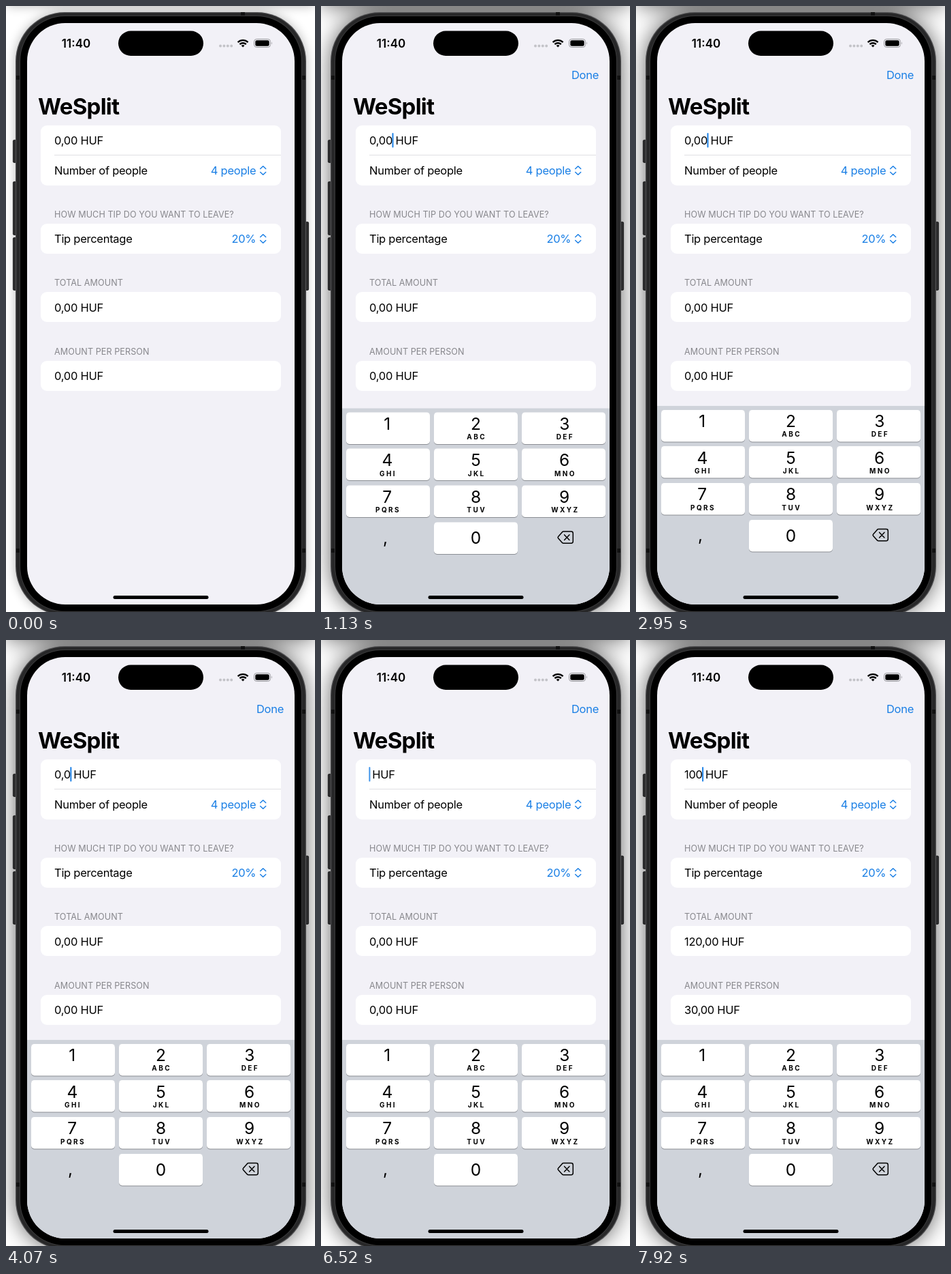
Write an HTML page that moves like this. It is 454x888 px and loops after 8 s.

```html
<!DOCTYPE html>
<html lang="en">
<head>
<meta charset="utf-8">
<title>Bill splitter</title>
<style>
html, body { margin: 0; width: 100%; height: 100%; overflow: hidden; background: #fff; }
svg { display: block; width: 454px; height: 888px; }
text { font: 16.5px Inter, sans-serif; letter-spacing: -.27px; font-optical-sizing: none; white-space: pre; }
.title { font-size: 33px; font-weight: 700; letter-spacing: -.75px; }
.clock { font-size: 17px; font-weight: 600; letter-spacing: 0; text-anchor: middle; }
.head { font-size: 12.6px; letter-spacing: .07px; fill: #87878c; }
.blue { fill: #1a7fe5; }
.end { text-anchor: end; }
.digit { font-size: 24.5px; letter-spacing: 0; text-anchor: middle; }
.letters { font-size: 10px; font-weight: 700; letter-spacing: 2.4px; text-anchor: middle; }
.chevron { fill: none; stroke: #1a7fe5; stroke-width: 1.5; stroke-linecap: round; stroke-linejoin: round; }
</style>
</head>
<body>
<svg viewBox="0 0 454 888">
  <defs>
    <filter id="blur" filterUnits="userSpaceOnUse" x="-150" y="-150" width="754" height="1250">
      <feGaussianBlur id="blurSize" stdDeviation="8"/>
    </filter>
    <clipPath id="screen"><rect x="31" y="25" width="393" height="852" rx="56"/></clipPath>
    <path id="chevrons" class="chevron" d="M-4-2.5L0-6.2L4-2.5M-4 2.5L0 6.2L4 2.5"/>
  </defs>

  <g id="shadow" filter="url(#blur)">
    <rect x="14" y="9" width="427" height="884" rx="72"/>
    <rect y="-60" width="454" height="60" rx="8"/>
  </g>

  <g fill="#2c2c2d" stroke="#161617" stroke-width=".8">
    <rect x="10.4" y="196.4" width="6" height="33" rx="1.5"/>
    <rect x="10.4" y="257.4" width="6" height="78" rx="1.5"/>
    <rect x="10.4" y="339.4" width="6" height="77" rx="1.5"/>
    <rect x="438.6" y="316.4" width="6" height="100" rx="1.5"/>
  </g>
  <rect x="14" y="9" width="427" height="884" rx="72" fill="#515153"/>
  <rect x="15.2" y="10.2" width="424.6" height="881.6" rx="71" fill="#272728"/>
  <path d="M345 12H351M15 105H21M434 105H440M15 798H21M434 798H440" stroke="#111" stroke-width="6"/>
  <rect x="20" y="14" width="415" height="874" rx="67" fill="#3a3a3b"/>
  <rect x="21" y="15" width="413" height="872" rx="66"/>
  <rect x="31" y="25" width="393" height="852" rx="56" fill="#f2f1f7"/>

  <rect x="165" y="36.5" width="125" height="36.5" rx="18.25"/>
  <text class="clock" x="103" y="60.5">11:40</text>
  <path d="M315 58.5H332" stroke="#c3c3c8" stroke-width="4" stroke-linecap="round" stroke-dasharray="0 5.4"/>
  <g fill="none" stroke="#000" stroke-width="2.4">
    <path d="M340.6 53.2a10.6 10.6 0 0 1 15 0M343.4 56.2a6.7 6.7 0 0 1 9.4 0"/>
    <path d="M348.1 60.6l-2.4-2.6a3.6 3.6 0 0 1 4.8 0z" fill="#000" stroke="none"/>
  </g>
  <rect x="364.5" y="48.5" width="24" height="12" rx="3.8" fill="none" stroke="#98989c"/>
  <rect x="366.3" y="50.3" width="20.4" height="8.4" rx="2.3"/>
  <path d="M390 52.6q1.8 1.9 0 3.8z" fill="#98989c"/>

  <text class="title" x="47" y="159">WeSplit</text>
  <g fill="#fff">
    <rect x="51" y="175" width="353" height="88" rx="9"/>
    <rect x="51" y="319" width="353" height="44" rx="9"/>
    <rect x="51" y="419" width="353" height="44" rx="9"/>
    <rect x="51" y="520" width="353" height="44" rx="9"/>
  </g>
  <path d="M71 218.5H404" stroke="#e0e0e3"/>
  <text id="amount" x="71" y="203"></text>
  <text x="71" y="247">Number of people</text>
  <text class="blue end" x="367.3" y="247">4 people</text>
  <use href="#chevrons" x="377.7" y="241"/>
  <text class="head" x="71" y="310">HOW MUCH TIP DO YOU WANT TO LEAVE?</text>
  <text x="71" y="347">Tip percentage</text>
  <text class="blue end" x="367.3" y="347">20%</text>
  <use href="#chevrons" x="377.7" y="341"/>
  <text class="head" x="71" y="410">TOTAL AMOUNT</text>
  <text id="total" x="71" y="447.7"></text>
  <text class="head" x="71" y="510.5">AMOUNT PER PERSON</text>
  <text id="share" x="71" y="548"></text>

  <g id="editing">
    <text class="blue end" x="408" y="107">Done</text>
    <rect id="cursor" class="blue" y="186" width="2" height="21.5" rx="1"/>
    <g clip-path="url(#screen)">
      <g id="keyboard">
        <rect x="31" y="586" width="393" height="310" fill="#cfd3da"/>
        <g id="keys"></g>
        <text class="digit" x="94.5" y="784">,</text>
        <g stroke="#000" stroke-width="1.5" stroke-linecap="round" stroke-linejoin="round">
          <path id="eraser" d="M356.2 766.6H367.6Q370.3 766.6 370.3 769.3V781Q370.3 783.7 367.6 783.7H356.2Q355.2 783.7 354.4 782.9L348.6 776.4Q347.5 775.2 348.6 774L354.4 767.4Q355.2 766.6 356.2 766.6Z"/>
          <path id="cross" d="M357.6 771.4L364.9 778.9M364.9 771.4L357.6 778.9"/>
        </g>
      </g>
    </g>
  </g>
  <rect x="157.5" y="864" width="140" height="5" rx="2.5"/>
</svg>
<script>
const LOOP = 8000;
const KEYBOARD_START = 766;
const $ = id => document.getElementById(id);
const clamp = v => Math.min(1, Math.max(0, v));

// [time, text in the amount field]
const typing = [[0, '0,00'], [3920, '0,0'], [4270, '0,'], [4550, '0'], [4830, ''],
  [6790, '1'], [7630, '10'], [7845, '100']];
// [fade-out start, fade-in start]
const blinks = [[1390, 1740], [2440, 2790], [3490, 3840], [5450, 5740], [6500, 6780]];
// [down, up]
const presses = {
  erase: [[3850, 4060], [4270, 4410], [4550, 4690], [4830, 4970]],
  1: [[6580, 6790]],
  0: [[7490, 7630], [7700, 7845]]
};

const letters = ['', 'ABC', 'DEF', 'GHI', 'JKL', 'MNO', 'PQRS', 'TUV', 'WXYZ'];
// Labels are spaced a little wider than the keys
function keyMarkup(digit, column, row, label = '') {
  const x = 37 + 129 * column, y = 592 + 53.7 * row, top = Math.floor(y);
  const middle = 97.3 + 130.2 * column;
  return `<rect x="${x}" y="${top + 1}" width="123" height="46.4" rx="4.6" fill="#8b8e94"/>
    <rect id="key${digit}" x="${x}" y="${top}" width="123" height="46.4" rx="4.6" fill="#fff"/>
    <text class="digit" x="${middle}" y="${y + (digit ? 25 : 31.5)}">${digit}</text>
    <text class="letters" x="${middle + 1.2}" y="${y + 39.3}">${label}</text>`;
}
$('keys').innerHTML = letters.map((label, i) =>
  keyMarkup(i + 1, i % 3, Math.floor(i / 3), label)).join('') + keyMarkup(0, 1, 3);

const money = value => value.toFixed(2).replace('.', ',') + ' HUF';

function setText(node, text) {
  if (node.textContent !== text) node.textContent = text;
}

function pressLevel(key, t, fade) {
  return Math.max(...presses[key].map(([down, up]) =>
    t < down ? 0 : t < up ? 1 : clamp(1 - (t - up) / fade)));
}

function paintKey(digit, t) {
  const p = pressLevel(digit, t, digit ? 200 : 75);
  $('key' + digit).setAttribute('fill', `rgb(${255 - 82 * p},${255 - 76 * p},${255 - 67 * p})`);
}

function render(t) {
  const active = t >= 500;
  $('blurSize').setAttribute('stdDeviation', active ? 16 : 8);
  $('shadow').setAttribute('opacity', active ? .6 : .28);

  const entry = typing.filter(([time]) => time <= t).pop()[1];
  const bill = parseFloat(entry.replace(',', '.')) || 0;
  setText($('amount'), entry + ' HUF');
  setText($('total'), money(bill * 1.2));
  setText($('share'), money(bill * 1.2 / 4));

  $('editing').style.display = t < KEYBOARD_START ? 'none' : '';
  if (t < KEYBOARD_START) return;

  const width = entry ? $('amount').getSubStringLength(0, entry.length) : 0;
  $('cursor').setAttribute('x', 70.4 + width);
  $('cursor').setAttribute('opacity', Math.min(...blinks.map(([out, back]) =>
    clamp(Math.max(1 - (t - out) / 130, (t - back) / 130)))));

  // Critically damped spring
  const s = 17.6 * (t - KEYBOARD_START) / 1000;
  $('keyboard').setAttribute('transform', `translate(0 ${291 * (1 + s) * Math.exp(-s)})`);
  paintKey(1, t);
  paintKey(0, t);
  const erasing = pressLevel('erase', t, 1) > 0;
  $('eraser').setAttribute('fill', erasing ? '#000' : 'none');
  $('cross').setAttribute('stroke', erasing ? '#cfd3da' : '#000');
}

const start = performance.now();
function tick() {
  render((performance.now() - start) % LOOP);
  requestAnimationFrame(tick);
}
tick();
</script>
</body>
</html>
```
